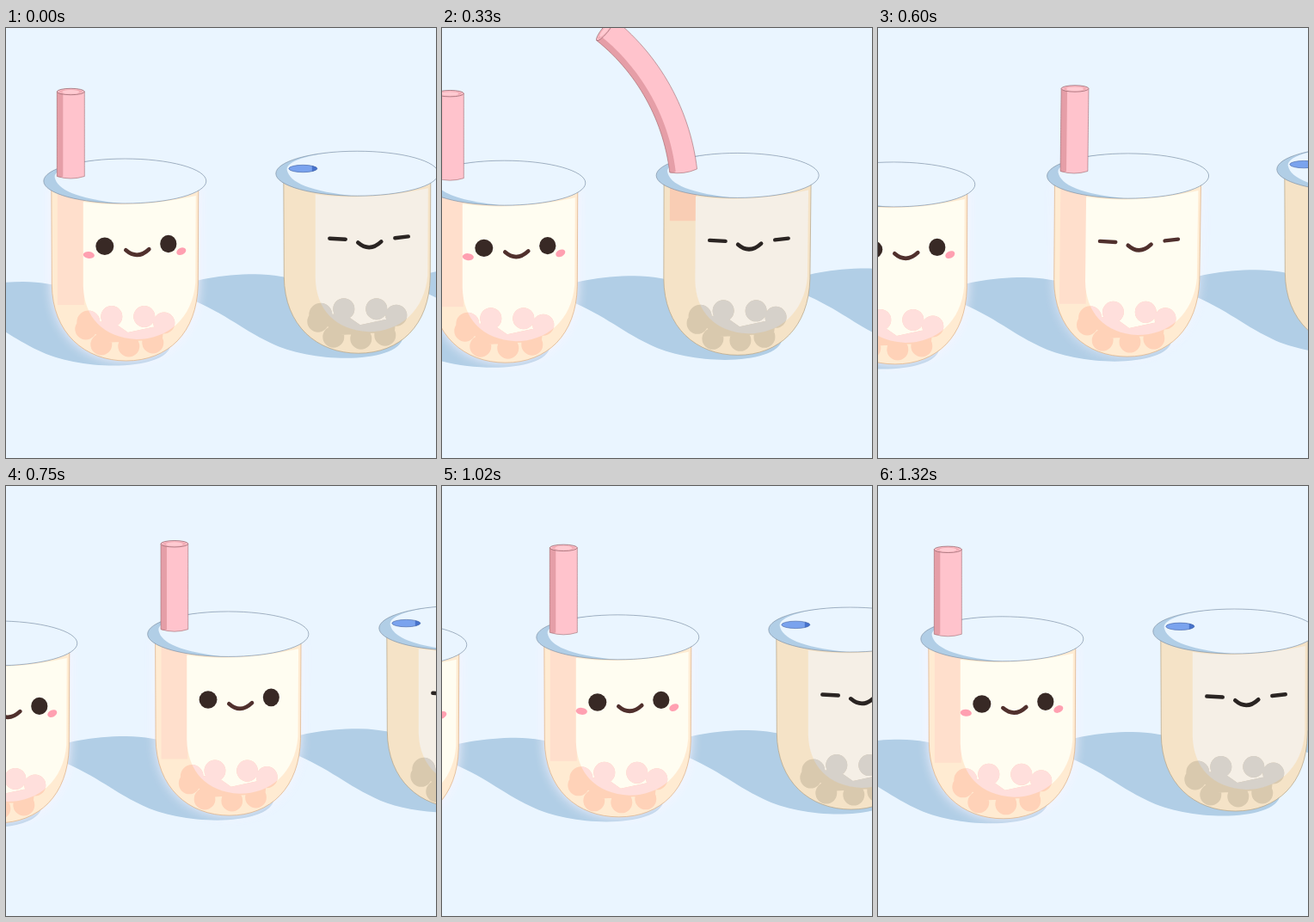
Write an HTML page with a canvas that moves like this. It is 500x500 px and loops after 1350 ms.

```html
<!DOCTYPE html>
<html lang="en">
<head>
<meta charset="utf-8">
<title>Bubble tea</title>
<style>
  html, body { margin: 0; width: 100%; height: 100%; overflow: hidden; background: #eaf5ff; }
  canvas { display: block; width: 500px; height: 500px; }
</style>
</head>
<body>
<canvas id="stage" width="500" height="500"></canvas>
<script>
const ctx = document.getElementById('stage').getContext('2d');
const LOOP = 1350, GAP = 270, RISE = 8.8;
const SKY = '#eaf5ff', SHADE = '#b1cee6';

// [empty, filling, full]
const TINT = {
  body: ['#f5e3c7', '#fde5ca', '#ffebd2'],
  panel: ['#f5efe6', '#fcf0e8', '#fffdf1'],
  straw: ['#f9cdb4', '#fad4bb', '#ffdfcc'],
  pearl: ['#d9c9ae', '#dfc8af', '#ffd2b8'],
  pearlLit: ['#d6d1ca', '#e0d7d1', '#ffdfdc'],
  edge: ['#b3a284', '#c9a884', '#dcae82'],
  ink: ['#2a2422', '#2e2523', '#50302d']
};

// Keyed values: [time, value] pairs
const SQUASH = [[330, 1], [420, .976], [455, .985], [600, 1.005], [690, 1.028], [800, .994], [900, 1]];
const LEAN = [[300, 0], [420, .025], [455, .024], [600, .011], [750, 0]];
const TIP_X = [[150, 25], [210, 51], [290, 75.5]];
const TIP_Y = [[150, -10], [210, 77], [290, 172.5]];
const DEPTH = [[290, 0], [400, 158], [450, 156], [600, 154], [750, 150]];
const LENGTH = [[290, 248.5], [400, 98.5], [450, 98.5], [600, 95.5], [690, 98.5]];
const BASE_ANGLE = [[150, 32], [210, 23], [290, 10], [390, 3], [450, 2], [550, 0]];
const TOP_ANGLE = [[210, 78], [290, 62], [390, 36], [450, 23], [550, 2], [600, 0]];
const COLOUR = [[390, 0], [450, 1], [590, 2]];
const GLOW = [[470, 0], [600, .65], [850, 1]];
const EYES = [[630, 0], [750, 1]];
const CHEEKS = [[750, 0], [900, .75], [1020, 1]];

const PEARLS = [[123, 335.5, 12.5], [161, 335.5, 12.5], [184, 343, 12.5], [96, 342, 13.5],
  [93, 350, 12.5], [111, 368, 12.5], [143, 370, 12.5], [171, 366, 12.5]];

function key(keys, t) {
  if (t <= keys[0][0]) return keys[0][1];
  for (let i = 1; i < keys.length; i++) {
    const [t0, a] = keys[i - 1], [t1, b] = keys[i];
    if (t <= t1) return a + (b - a) * (t - t0) / (t1 - t0);
  }
  return keys[keys.length - 1][1];
}

function tint(name, stage) {
  const i = Math.min(1, Math.floor(stage)), p = stage - i;
  const [a, b] = TINT[name].slice(i, i + 2).map(h => parseInt(h.slice(1), 16));
  const part = s => Math.round((a >> s & 255) * (1 - p) + (b >> s & 255) * p);
  return `rgb(${part(16)},${part(8)},${part(0)})`;
}

function fill(shape, colour) {
  ctx.fillStyle = colour;
  ctx.fill(shape);
}

function stroke(shape, colour, width) {
  ctx.strokeStyle = colour;
  ctx.lineWidth = width;
  ctx.stroke(shape);
}

function oval(x, y, rx, ry = rx, turn = 0) {
  const p = new Path2D();
  p.ellipse(x, y, rx, ry, turn, 0, Math.PI * 2);
  return p;
}

const body = new Path2D('M53 184L53.5 298C54 355 92 387 140 387C188 387 222.5 355 223.5 298L224 184Z');
const panel = new Path2D('M90 202Q150 211 221 195L220.5 296C217 338 188 362 152 362C113 360 91 336 90 300Z');
const lid = oval(138.5, 178, 94.5, 26);
const lidLight = new Path2D('M125 152C78 155 55 165 57 174C60 188 82 199 140 204.5L240 210L240 145Z');
const hole = oval(75.5, 172.3, 16.5, 4.2);
const ground = new Path2D('M-70 309C-55 303 -20 295 20 295C60 295 100 310 150 330L192 368C187 400 85 399 38 375C0 357 -15 339 -70 318Z');
const mouth = new Path2D('M139.5 258.3Q153 270 166.5 257.2');
const dashes = new Path2D('M106.5 253.5L125 254.5M182.5 253L198 251.2');
const pearls = new Path2D('M92 344L122 340L142 354L184 345L182 362L115 366Z');
PEARLS.forEach(p => pearls.addPath(oval(...p)));

function drawFace(p, open, cheeks) {
  const ink = tint('ink', p);
  ctx.lineCap = 'round';
  stroke(mouth, ink, 4.6);
  if (open < .2) stroke(dashes, ink, 4.4);
  else {
    fill(oval(115, 253.7, 10.5, 10.2 * open), '#382925');
    fill(oval(189, 251, 9.6, 10.2 * open), '#382925');
  }
  if (cheeks > 0) {
    fill(oval(96.5, 264, 6.6 * cheeks, 4 * cheeks, .1), '#ffa0b1');
    fill(oval(204, 259.7, 5.8 * cheeks, 4 * cheeks, -.45), '#ffa0b1');
  }
  ctx.lineCap = 'butt';
}

function drawStraw(x, y, length, baseAngle, topAngle) {
  const STEPS = 30, rad = Math.PI / 180;
  const spine = [[x, y, baseAngle * rad]];
  for (let i = 1; i <= STEPS; i++) {
    const a = (baseAngle + (topAngle - baseAngle) * (i - .5) / STEPS) * rad;
    x -= Math.sin(a) * length / STEPS;
    y -= Math.cos(a) * length / STEPS;
    spine.push([x, y, a]);
  }
  const at = ([px, py, a], d) => [px + Math.cos(a) * d, py - Math.sin(a) * d];
  const strip = (l, r, dip) => {
    const p = new Path2D();
    spine.forEach(s => p.lineTo(...at(s, l)));
    [...spine].reverse().forEach(s => p.lineTo(...at(s, r)));
    const base = spine[0], mid = at(base, (l + r) / 2);
    p.quadraticCurveTo(mid[0] + Math.sin(base[2]) * dip, mid[1] + Math.cos(base[2]) * dip, ...at(base, l));
    p.closePath();
    return p;
  };
  const whole = strip(-16, 16, 5);
  fill(whole, '#ffc3cc');
  fill(strip(-16, -9, 2), '#e59ea7');
  stroke(whole, '#9c6a70', .6);
  const turn = -topAngle * rad, rim = oval(x, y, 16, 3.7, turn);
  fill(rim, '#ffc3cc');
  fill(oval(x, y, 13.5, 2.7, turn), '#f2acb5');
  fill(oval(x, y + .3, 10, 2.3, turn), '#ffcbd2');
  stroke(rim, '#8f5c63', .7);
}

function drawHole() {
  fill(hole, '#7aa3ee');
  ctx.save();
  ctx.clip(hole);
  ctx.fillStyle = '#4773cc';
  ctx.fillRect(86, 166, 8, 12);
  ctx.restore();
  stroke(hole, '#40609f', .6);
}

function drawCup(t) {
  const p = key(COLOUR, t), glow = key(GLOW, t), depth = key(DEPTH, t), sy = key(SQUASH, t);
  ctx.save();
  ctx.translate(138.5, 387);
  ctx.transform(2 - sy, 0, -key(LEAN, t), sy, 0, 0);
  ctx.translate(-138.5, -387);

  ctx.save();
  ctx.shadowColor = `rgba(250,244,255,${glow})`;
  ctx.shadowBlur = glow > 0 ? 13 : 0;
  fill(body, tint('body', p));
  ctx.restore();

  ctx.save();
  ctx.clip(body);
  ctx.fillStyle = tint('straw', p);
  ctx.fillRect(60, 172, 31, depth);
  fill(panel, tint('panel', p));
  fill(pearls, tint('pearl', p));
  ctx.clip(panel);
  fill(pearls, tint('pearlLit', p));
  ctx.restore();
  stroke(body, tint('edge', p), .7);
  drawFace(p, key(EYES, t), key(CHEEKS, t));

  fill(lid, SHADE);
  ctx.save();
  ctx.clip(lid);
  fill(lidLight, SKY);
  ctx.restore();
  stroke(lid, '#77899c', .6);
  if (depth === 0) drawHole();
  if (t > 130) {
    drawStraw(key(TIP_X, t), key(TIP_Y, t), key(LENGTH, t), key(BASE_ANGLE, t), key(TOP_ANGLE, t));
  }
  ctx.restore();
}

// Shadow cast on the ground by the straw in flight
function drawStrawShadow(t) {
  if (t < 130 || t > 290) return;
  const h = 387 - key(TIP_Y, t);
  const x = 63 - 1.02 * h + key(TIP_X, t), y = 387 - .4 * h;
  stroke(new Path2D(`M${x} ${y}l-120 -26`), SHADE, 11);
}

function draw(t) {
  ctx.fillStyle = SKY;
  ctx.fillRect(0, 0, 500, 500);
  const cups = [[-1, LOOP], [0, LOOP], [1, t], [2, 0], [3, 0]];
  const each = paint => cups.forEach(([slot, age]) => {
    const dx = GAP * (slot - t / LOOP);
    ctx.save();
    ctx.translate(dx, -RISE * dx / GAP);
    paint(age);
    ctx.restore();
  });
  each(age => { fill(ground, SHADE); drawStrawShadow(age); });
  each(drawCup);
}

const start = performance.now();
function tick() {
  draw((performance.now() - start) % LOOP);
  requestAnimationFrame(tick);
}
tick();
</script>
</body>
</html>
```
